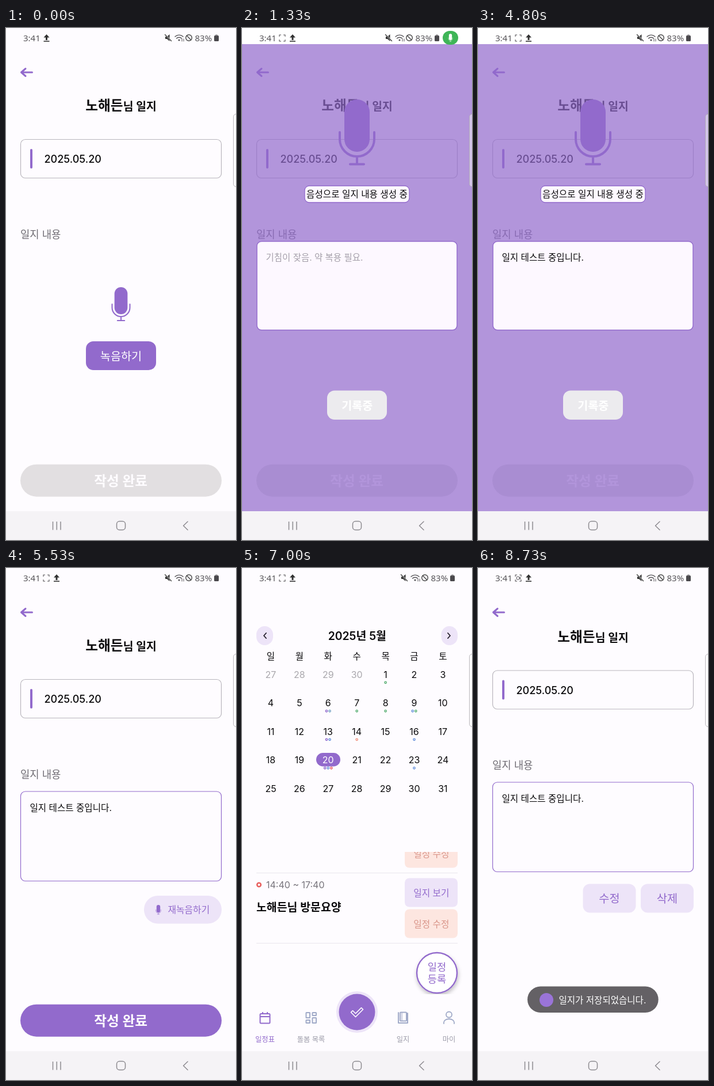
An HTML page for the animation above (9 s loop, 400 px wide and 889 px high).

```html
<!DOCTYPE html>
<html lang="ko">
<head>
<meta charset="utf-8">
<title>일지</title>
<style>
html, body { margin: 0; width: 100%; height: 100%; overflow: hidden; background: #fefcff; }
svg { display: block; width: 100%; height: 100%; }
text { font-family: Inter, "Noto Sans CJK KR", "Noto Sans CJK", sans-serif; white-space: pre; }
.sys { font-family: "Noto Sans", sans-serif; }
</style>
</head>
<body>
<svg id="stage" viewBox="0 0 400 889" xmlns="http://www.w3.org/2000/svg"></svg>
<script>
const LOOP = 9000;
const PURPLE = '#926acc', PALE = '#ede4f8', BG = '#fefcff', GREY = '#8c8a8f', INK = '#555357';
const PERSON = '노해든', NOTE = '일지 테스트 중입니다.';

// Markup helpers; text is placed by its vertical centre
const text = (x, cy, size, str, { fill = '#0b0a0c', weight = 400, anchor = 'start', cls = '' } = {}) =>
  `<text class="${cls}" x="${x}" y="${cy + size * 0.375}" font-size="${size}" font-weight="${weight}" text-anchor="${anchor}" fill="${fill}">${str}</text>`;
const mid = (x, cy, size, str, opts = {}) => text(x, cy, size, str, { ...opts, anchor: 'middle' });
const box = (x, y, w, h, r, fill, stroke = 'none', sw = 1.2) =>
  `<rect x="${x}" y="${y}" width="${w}" height="${h}" rx="${r}" fill="${fill}" stroke="${stroke}" stroke-width="${sw}"/>`;
const line = (d, stroke, w, cap = 'round') =>
  `<path d="${d}" fill="none" stroke="${stroke}" stroke-width="${w}" stroke-linecap="${cap}" stroke-linejoin="${cap === 'round' ? 'round' : 'miter'}"/>`;
const dot = (x, y, r, fill, stroke = 'none', sw = 1) =>
  `<circle cx="${x}" cy="${y}" r="${r}" fill="${fill}" stroke="${stroke}" stroke-width="${sw}"/>`;
const group = (id, body, attrs = '') => `<g id="${id}" ${attrs}>${body}</g>`;

const mic = (x, y, scale, color = PURPLE) =>
  `<g transform="translate(${x} ${y}) scale(${scale})">` +
  box(-22, 0, 44, 91, 22, color) +
  line('M-30 57V69a30 30 0 0 0 60 0V57M0 99V112M-12 112.5H12', color, 4) + '</g>';

const submit = (y, fill) => box(25, y, 350, 56, 28, fill) +
  mid(199.7, y + 28, 23.7, '작성 완료', { fill: BG, weight: 700 });

const header = titleY =>
  line('M45.500 77H27M34 70.500L26.500 77L34 83.500', PURPLE, 3) +
  `<text x="200" y="${titleY + 9}" text-anchor="middle" font-weight="600" fill="#0b0a0c"><tspan font-size="23.700">${PERSON}</tspan><tspan font-size="19.300">님 일지</tspan></text>`;

const dateCard = top => box(25.5, top, 349, 67, 8, BG, '#b9b6bd') +
  box(42, top + 16.5, 4, 34, 2, PURPLE) +
  text(66.5, top + 34, 18, '2025.05.20', { weight: 500 }) +
  text(25, top + 164.5, 17.8, '일지 내용', { fill: '#6e6b72' });

const noteCard = top => box(25.5, top, 349, 155.5, 8, BG, PURPLE) +
  text(41.5, top + 28, 15.6, NOTE);

const tabBar = () => {
  const off = '#9c9ba9', blue = '#a0aac8';
  return box(0, 740, 400, 99, 0, BG) +
    box(31.5, 774, 17, 16.5, 1.5, 'none', PURPLE, 2) +
    line('M32 779H48M36 771V774M44 771V774', PURPLE, 2, 'butt') +
    [[111.5, 772, 9], [122.5, 772, 5], [111.5, 785, 5], [122.5, 781, 9]]
      .map(([x, y, h]) => box(x, y, 6.5, h, 0.5, 'none', blue, 2)).join('') +
    box(275, 771.5, 11, 15, 1, 'none', blue, 2) + line('M272 772V790H288V773', blue, 2) +
    line('M278 772V786', blue, 1.2) +
    dot(360, 775.5, 5, 'none', blue, 1.8) + line('M351 791V789a9 6 0 0 1 18 0V791', blue, 1.8) +
    dot(200, 771, 36, PALE) + dot(200, 771, 31.5, PURPLE) +
    line('M189.500 771.500L192.500 768.500L197.500 773.500L207.500 763.500L210.500 766.500L197.500 779.500Z', '#fff', 1.6) +
    [[40, '일정표', PURPLE], [120, '돌봄 목록', off], [280, '일지', off], [360, '마이', off]]
      .map(([x, s, fill]) => mid(x, 818, 12.3, s, { fill })).join('');
};

const calendar = () => {
  const rows = [184.5, 234, 283.5, 333, 383];
  const marks = { 1: 'g', 6: 'pc', 7: 'g', 8: 'g', 9: 'bg', 13: 'pb', 14: 'o', 16: 'b', 20: 'pbr', 23: 'b' };
  const tint = { g: '#4ba868', p: '#8a62cb', c: '#6c9dc0', b: '#5f8bd8', o: '#f08b78', r: '#e8555c' };
  let out = box(25, 101, 29, 33, 14.5, PALE) + box(346.5, 101, 28.5, 33, 14.5, PALE) +
    line('M42 113L38 117.500L42 122M358 113L362 117.500L358 122', '#221d29', 1.8) +
    mid(200.3, 118, 19.4, '2025년 5월', { weight: 600 });
  [...'일월화수목금토'].forEach((d, i) => out += mid(50 + 49.9 * i, 153, 15.6, d));
  for (let i = 0; i < 35; i++) {
    const day = i < 4 ? 27 + i : i - 3;
    const x = 50 + 49.9 * (i % 7), y = rows[Math.floor(i / 7)];
    const picked = i === 23;
    if (picked) out += box(x - 20.8, y - 12, 42, 23.5, 11.7, PURPLE);
    out += mid(x, y, 16, day, { fill: i < 4 ? '#aaa8ad' : picked ? '#fff' : '#0b0a0c' });
    const kinds = i < 4 ? '' : marks[day] || '';
    [...kinds].forEach((k, n) =>
      out += dot(x + (n - (kinds.length - 1) / 2) * 5.6, y + 14.3, 1.7, '#fff', tint[k], 1.3));
  }
  return out;
};

const listButton = (y, str, fill, color) => box(283, y, 92, 50, 8, fill) +
  mid(329.3, y + 25.5, 15.7, str, { fill: color });

const schedule = () => {
  const edit = ['일정 수정', '#fde6e0', '#d99488'];
  return `<g clip-path="url(#listClip)">` + listButton(470.5, ...edit) + '</g>' +
    line('M25 529.500H375M25 651.500H375', '#e9e6ec', 1, 'butt') +
    dot(29.5, 550, 3.3, '#fff', '#e8605f', 2.5) +
    text(42, 550, 16, '14:40 ~ 17:40', { fill: '#77747b' }) +
    text(25, 589, 19.4, `${PERSON}님 방문요양`, { weight: 600 }) +
    listButton(538.5, '일지 보기', PALE, PURPLE) + listButton(592.5, ...edit) +
    `<g filter="url(#shade)">${dot(339, 703, 35, '#fff', PURPLE, 2.4)}</g>` +
    mid(339, 692, 17.6, '일정', { fill: PURPLE }) + mid(339, 713.5, 17.6, '등록', { fill: PURPLE });
};

const modal = () =>
  box(0, 0, 400, 28, 0, '#fff') +
  `<rect y="28" width="400" height="811" fill="${PURPLE}" fill-opacity=".7"/>` +
  mic(200, 124, 1) +
  box(109, 274, 182, 29, 8, '#fdf8ff', PURPLE, 1.3) +
  mid(200, 288.5, 15.65, '음성으로 일지 내용 생성 중') +
  box(26, 370.5, 348, 154, 8, '#fdf8ff', PURPLE, 1.4) +
  group('hint', text(41.5, 398, 15.5, '기침이 잦음. 약 복용 필요.', { fill: '#a5a0aa' })) +
  group('early', text(41.5, 398, 15.6, '일지.')) +
  group('full', text(41.5, 398, 15.6, NOTE)) +
  box(148, 629.5, 104, 50.5, 13, '#ecebee') +
  mid(200.3, 655.5, 19.6, '기록중', { fill: '#fff', weight: 700 });

const statusBar = () =>
  text(30, 17, 15, '3:41', { fill: INK, cls: 'sys' }) +
  group('record',
    line('M65 15V12H68M72 12H75V15M75 20V23H72M68 23H65V20', INK, 1.1, 'butt') +
    group('camera', box(67.2, 15, 4.6, 5, 1, 'none', INK, 1) + line('M72.500 16.500L73.500 16V19.500L72.500 18.500', INK, 1))) +
  group('upload', `<path d="M0 11L5 16.500H1.500V21H-1.500V16.500H-5Z" fill="#333"/>` + line('M-5 23H5', '#333', 1.6, 'butt')) +
  group('tray',
    `<path d="M277 15h3l4.500-4v12l-4.500-4h-3Z" fill="#333"/>` + line('M277 11.500L287.500 22.500', '#fff', 2.4) + line('M276.500 11.500L287.500 22.500', '#333', 1.3) +
    line('M294 15a10 10 0 0 1 14 0M296.500 18a6.500 6.500 0 0 1 9 0', INK, 1.4) + dot(301, 21, 1.6, INK) +
    line('M306 19V23M309 19V23', INK, 1) +
    dot(318, 17, 5.3, 'none', '#444', 1.4) + line('M314.300 13.300L321.700 20.700', '#444', 1.4) +
    text(328.5, 17, 15, '83%', { fill: INK, cls: 'sys' }) +
    box(362, 13, 8, 10, 1.5, '#4a484c') + box(364, 11.5, 4, 2, 0.5, '#8a888c')) +
  `<rect id="chip" fill="#3fb557"/>` + group('chipMic', mic(362.5, 10, 0.12, '#fff'));

const navBar = () => box(0, 839, 400, 50, 0, '#f5f3f6') +
  line('M81.500 857V871.500M88.300 857V871.500M95 857V871.500', GREY, 1.5, 'butt') +
  box(192.5, 856.5, 15, 15, 4.8, 'none', GREY, 1.5) +
  line('M316 857L308.500 864.300L316 871.500', GREY, 1.5);

const toast = () => box(86, 726.5, 227.7, 45.5, 22.7, '#646165') +
  dot(119, 750, 12, '#9a74d8') +
  text(140.5, 750.5, 15.55, '일지가 저장되었습니다.', { fill: '#fff' });

document.getElementById('stage').innerHTML =
  `<defs><clipPath id="listClip"><rect x="0" y="493" width="400" height="346"/></clipPath>
   <filter id="shade" x="-30%" y="-30%" width="160%" height="160%"><feDropShadow dx="1" dy="4" stdDeviation="3.500" flood-color="#000" flood-opacity=".24"/></filter></defs>` +
  box(0, 0, 400, 889, 0, BG) +
  group('form', header(134) + dateCard(193.5)) +
  group('recorder', mic(200, 450, 0.516) + box(139, 544, 122, 50, 13, PURPLE) +
    mid(200, 569.5, 19.7, '녹음하기', { fill: '#fff', weight: 500 })) +
  group('disabled', submit(757.7, '#e2dfe1')) +
  group('written', noteCard(388) + box(240, 569, 135, 48.5, 24, PALE) +
    mic(265, 585, 0.145) + text(281.5, 593.5, 15.8, '재녹음하기', { fill: PURPLE })) +
  group('sendLow', submit(757.7, PURPLE)) +
  group('sendHigh', submit(674, PURPLE)) +
  group('month', calendar() + schedule()) +
  group('tabs', tabBar()) +
  group('detail', header(119) + dateCard(178) + noteCard(372) +
    box(182.5, 548.5, 92, 50, 12, PALE) + box(283, 548.5, 92, 50, 12, PALE) +
    mid(228.5, 574, 19.8, '수정', { fill: PURPLE, weight: 500 }) + mid(329, 574, 19.8, '삭제', { fill: PURPLE, weight: 500 })) +
  group('modal', modal()) +
  group('toast', toast()) +
  statusBar() +
  `<rect x="395.500" y="149.500" width="12" height="126" rx="4.500" fill="#fff" fill-opacity=".45" stroke="#aaa7ad" stroke-opacity=".8"/>` +
  navBar() +
  `<circle id="touch" r="9.300" fill="#f4f1f8" fill-opacity=".52" stroke="#8c8498" stroke-opacity=".4"/>`;

const el = {};
document.querySelectorAll('#stage [id]').forEach(n => el[n.id] = n);

const ramp = (t, a, b) => Math.min(1, Math.max(0, (t - a) / (b - a)));
const ease = k => k * k * (3 - 2 * k);
const lerp = (a, b, k) => a + (b - a) * k;
const show = (id, on) => el[id].setAttribute('opacity', +on);
const set = (id, attrs) => Object.entries(attrs).forEach(([k, v]) => el[id].setAttribute(k, v));

// start, end, x, y
const TAPS = [[70, 330, 224, 570], [5000, 5230, 251, 671], [6470, 6800, 172, 788], [7670, 7930, 304, 563]];
const OPEN = 170, CLOSE = 5270, TABS = 6670, MONTH = 6870, DETAIL = 8000;

function render(t) {
  const within = (a, b) => t >= a && t < b;

  show('form', t < MONTH);
  show('recorder', t < OPEN);
  show('disabled', t < CLOSE);
  show('written', within(CLOSE, MONTH));
  show('sendLow', within(CLOSE, TABS));
  show('sendHigh', within(TABS, MONTH));
  show('month', within(MONTH, DETAIL));
  show('tabs', within(TABS, DETAIL));
  show('detail', t >= DETAIL);
  show('modal', ramp(t, OPEN, 260) * (1 - ramp(t, CLOSE, 5470)));
  show('hint', t < 2400);
  show('early', within(2400, 3130));
  show('full', t >= 3130);
  show('toast', ramp(t, 7070, 7270));

  // Screen recording icon slides in, then blinks
  show('record', ramp(t, 220, 420));
  set('upload', { transform: `translate(${lerp(70.5, 88, ease(ramp(t, 70, 385)))} 0)` });
  const blink = t >= 4000 ? (t - 4000) % 519 < 266 : within(3000, 3270) || within(3530, 3800);
  show('camera', blink);

  // Microphone chip grows, then shrinks to a dot
  const grow = ease(ramp(t, 870, 1130)), shrink = ease(ramp(t, 2330, 2500));
  const w = lerp(27 * grow, 4, shrink), h = lerp(24, 4, shrink);
  set('chip', {
    x: lerp(376, 379, shrink) - w, y: lerp(5, 18.5, shrink), width: w, height: h, rx: h / 2,
    opacity: grow * (1 - ramp(t, 2800, 2930))
  });
  show('chipMic', grow * (1 - ramp(t, 2330, 2400)));
  set('tray', { transform: `translate(${-27 * grow * (1 - shrink)} 0)` });

  const tap = TAPS.find(([a, b]) => within(a, b));
  show('touch', tap ? 1 - ramp(t, tap[1] - 50, tap[1]) : 0);
  if (tap) set('touch', { cx: tap[2], cy: tap[3] });
}

const start = performance.now();
function tick() {
  render((performance.now() - start) % LOOP);
  requestAnimationFrame(tick);
}
tick();
</script>
</body>
</html>
```
